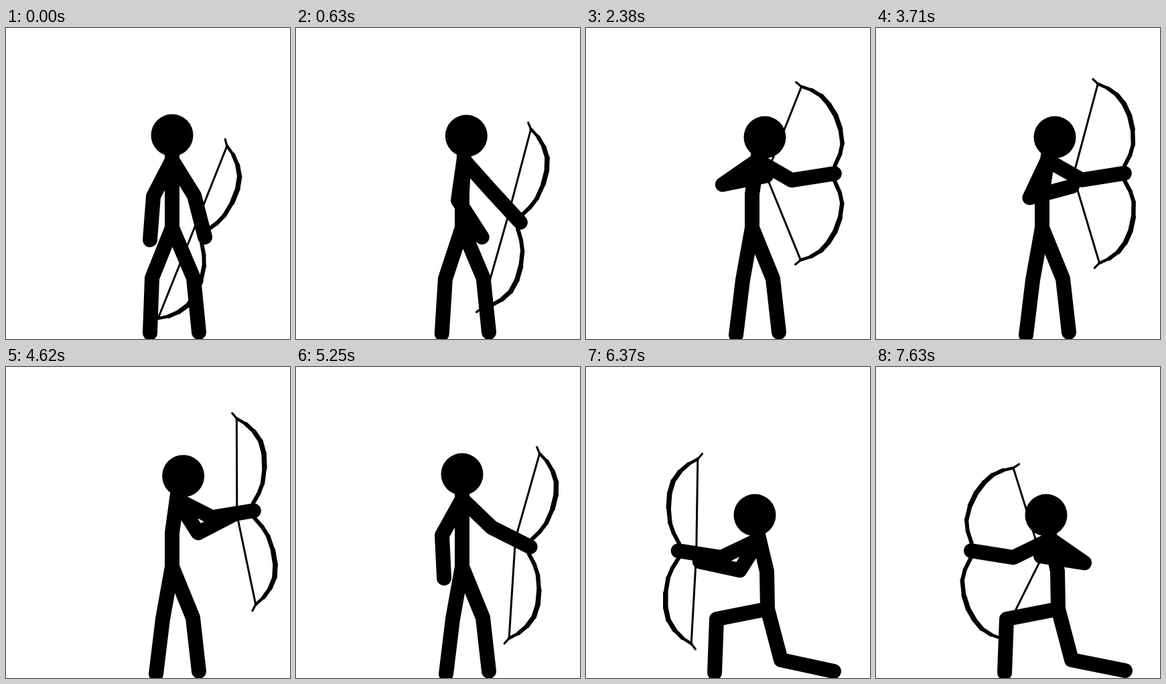
An HTML page that plays this animation: 424 px wide and 464 px high, repeating every 8 s.

```html
<!DOCTYPE html>
<html lang="en">
<head>
<meta charset="utf-8">
<title>Archer</title>
<style>
  html, body { margin: 0; width: 100%; height: 100%; overflow: hidden; background: #fff; }
  svg { display: block; width: 424px; height: 464px; }
  path { fill: none; stroke: #000; stroke-linecap: round; stroke-linejoin: round; }
</style>
</head>
<body>
<svg id="stage" viewBox="0 0 424 464"></svg>
<script>
const LOOP = 8000, STEP = 70;

// Torso: head, neck, middle, hip as points
const upright = [248,160, 248,190, 248,244, 248,298];
const lean    = [267,163, 257,190, 248,248, 248,298];
const crouch  = [260,178, 259,209, 259,264, 258,318];
const kneel   = [252,221, 257,250, 270,305, 271,361];
const kneelUp = [254,221, 259,250, 271,305, 272,361];

// Limbs: one vector per bone
const legs = {
  wide:    [-30,75, -3,82, 32,75, 8,81],
  step:    [-14,78, -10,82, 31,76, 9,80],
  crouch:  [-61,48, -7,82, -1,81, 60,52],
  kneel:   [-76,15, -3,80, 20,76, 79,17],
  kneelUp: [-77,15, -3,80, 20,76, 80,16]
};
const hang = [33,53, 16,62], aim = [53,28.5, 62,-10], aimFull = [51,29.5, 64,-10];
const aimLeft = [-57,27, -64,-10];
const nocking = [30,51.5, 63,-20], pulled = [-52,36, 65,-13], loose = [33,48, 60,-25];

// Bow: two limb angles, nock offset from the grip, bend
const bowDown = [13.6,30, -18,-8, 0], bowUp = [-7.8,12.3, -25,9, 0];
const bowDrawn = [-20.8,21.3, -102,3, 1], bowLoose = [-8,4, -25,5, 0];
const bowLeft = [172,192, 27,5, 0];

// Each key is [step, value]
const tracks = {
  torso: [[5,upright], [17,lean], [65,lean], [73,upright], [77,upright],
          [85,crouch], [89,kneel], [105,kneel], [109,kneelUp]],
  legs: [[5,legs.wide], [18,legs.step], [77,legs.step], [85,legs.crouch],
         [89,legs.kneel], [105,legs.kneel], [109,legs.kneelUp]],
  draw: [[5,[-28,54,-5,65]], [17,nocking], [30,nocking], [34,pulled], [52,pulled],
         [55,loose], [65,loose], [66,[32,50,56,-29]], [73,[-31,54,8,63]],
         [77,[-29,54,-2,65]], [85,[-44,44,-12,62]], [89,[-44,40,-40,42]],
         [91,[-29,46,-60,-13]], [105,[-29,46,-60,-13]], [109,[50.5,35,-65,-10]]],
  hold: [[5,hang], [17,aim], [30,aim], [34,aimFull], [52,aimFull], [55,aim], [65,aim],
         [66,[53,27,62,-10]], [73,[53,30,59,-24]], [77,hang], [85,[17,56,-50,42]],
         [89,aimLeft], [105,aimLeft], [109,[-55.5,27,-63,-10]]],
  bow: [[5,bowDown], [17,bowUp], [30,bowUp], [34,bowDrawn], [52,bowDrawn],
        [55,bowLoose], [65,bowLoose], [66,[-10.5,-1.2,-25,6,0]], [73,[-2,-4,-26,-16,0]],
        [77,bowDown], [85,[121,129.5,3,-28,0]], [89,bowLeft], [105,bowLeft],
        [109,[161,207,105,11,1]]]
};

// Bow limb profile: distance along, belly at rest, belly when drawn
const along = [0, 11, 24, 38, 60, 81, 100, 116, 129.5, 140, 149];
const rest  = [0, 1, 12, 20.5, 27.5, 30.5, 29, 22, 12, 0, -5];
const drawn = [2, 5, 18, 27, 32, 32.5, 29, 23, 12.5, 0, -5];
const thick = [5.5, 6, 6, 6.5, 7.5, 7.5, 7, 6, 4.5, 3.2];
const NOCK = 9;

const stage = document.getElementById('stage');
function add(tag, attrs) {
  const el = document.createElementNS('http://www.w3.org/2000/svg', tag);
  for (const k in attrs) el.setAttribute(k, attrs[k]);
  return stage.appendChild(el);
}
const limbs = [0, 1].map(() => thick.map(w => add('path', { 'stroke-width': w })));
const string = add('path', { 'stroke-width': 3 });
const body = add('path', { 'stroke-width': 22 });
const head = add('circle', { r: 31.5 });

const mix = (a, b, u) => a + (b - a) * u;
const line = pts => 'M' + pts.map(p => p[0].toFixed(2) + ' ' + p[1].toFixed(2)).join('L');
const mixAll = (a, b, u) => a.map((v, i) => mix(v, b[i], u));

// Turn every bone the short way round
function turnAll(a, b, u) {
  const out = [];
  for (let i = 0; i < a.length; i += 2) {
    const from = Math.atan2(a[i + 1], a[i]);
    const d = Math.atan2(b[i + 1], b[i]) - from;
    const ang = from + Math.atan2(Math.sin(d), Math.cos(d)) * u;
    const len = mix(Math.hypot(a[i], a[i + 1]), Math.hypot(b[i], b[i + 1]), u);
    out.push(len * Math.cos(ang), len * Math.sin(ang));
  }
  return out;
}

function sample(keys, n, blend) {
  if (n <= keys[0][0]) return keys[0][1];
  for (let i = 1; i < keys.length; i++) {
    const [n0, a] = keys[i - 1], [n1, b] = keys[i];
    if (n <= n1) return blend(a, b, (n - n0) / (n1 - n0));
  }
  return keys[keys.length - 1][1];
}

function chain(p, v, i = 0) {
  const q = [p[0] + v[i], p[1] + v[i + 1]];
  return [p, q, [q[0] + v[i + 2], q[1] + v[i + 3]]];
}

function bowLimb(grip, deg, side, bend) {
  const r = deg * Math.PI / 180, s = Math.sin(r), c = Math.cos(r);
  const size = 1 - 0.01 * bend;
  return along.map((d, i) => {
    const belly = mix(rest[i], drawn[i], bend);
    return [grip[0] + side * s * d * size + c * belly,
            grip[1] - side * c * d * size + s * belly];
  });
}

function render(t) {
  const n = Math.floor(t / STEP);
  const torso = sample(tracks.torso, n, mixAll);
  const leg = sample(tracks.legs, n, turnAll);
  const bow = sample(tracks.bow, n, mixAll);
  const [top, neck, mid, hip] = [0, 2, 4, 6].map(i => torso.slice(i, i + 2));
  const shoulder = mixAll(neck, mid, 0.13);
  const drawArm = chain(shoulder, sample(tracks.draw, n, turnAll));
  const holdArm = chain(shoulder, sample(tracks.hold, n, turnAll));
  const grip = holdArm[2];

  head.setAttribute('cx', top[0]);
  head.setAttribute('cy', top[1]);
  body.setAttribute('d', [[neck, mid, hip], drawArm, holdArm,
    chain(hip, leg), chain(hip, leg, 4)].map(line).join(''));

  const ends = limbs.map((parts, k) => {
    const pts = bowLimb(grip, bow[k], k ? -1 : 1, bow[4]);
    parts.forEach((el, i) => el.setAttribute('d', line([pts[i], pts[i + 1]])));
    return pts[NOCK];
  });
  string.setAttribute('d', line([ends[0], [grip[0] + bow[2], grip[1] + bow[3]], ends[1]]));
}

function tick() {
  render(performance.now() % LOOP);
  requestAnimationFrame(tick);
}
tick();
</script>
</body>
</html>
```
